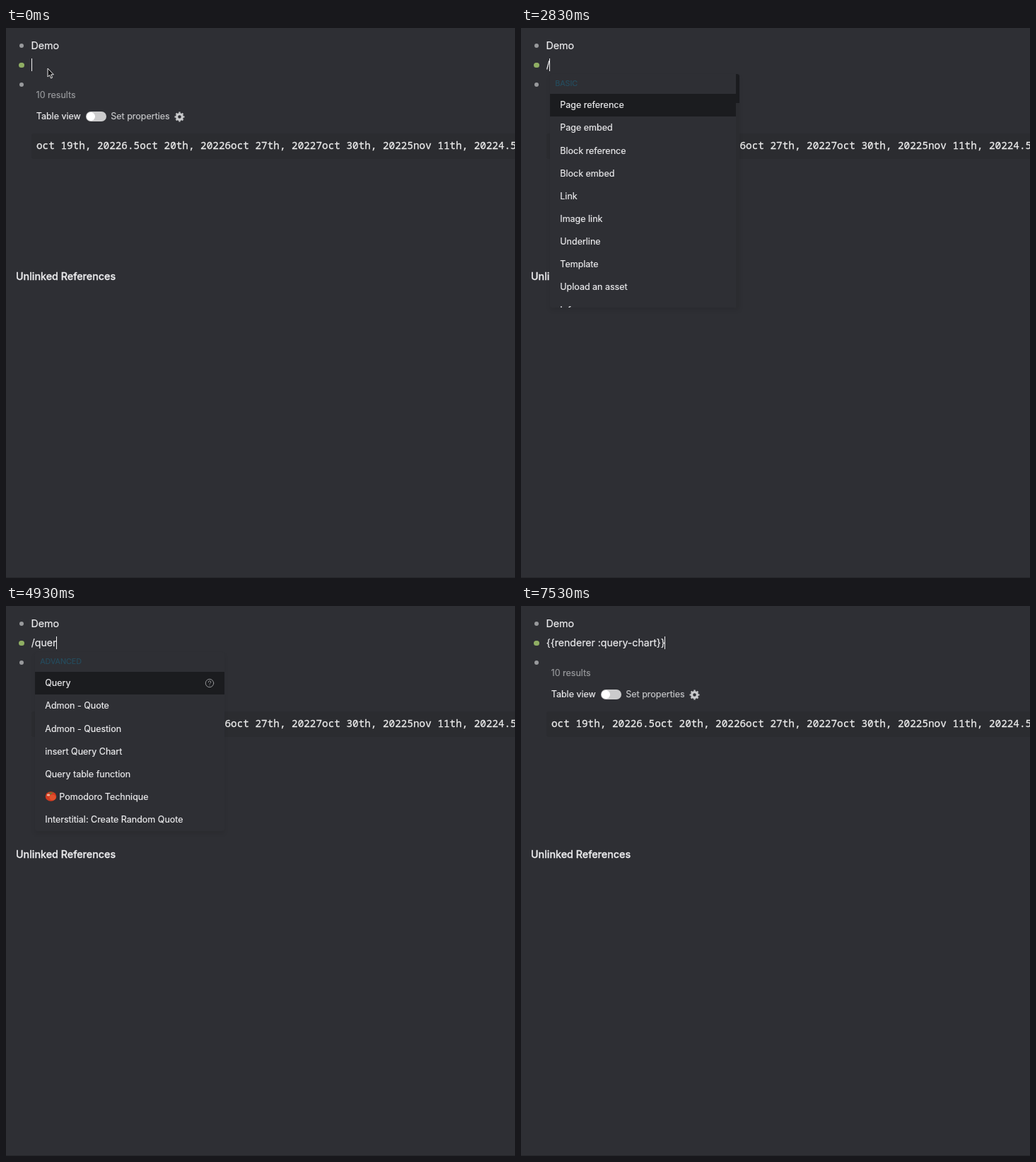
An HTML page for the animation above (8000 ms loop, 720 by 777 pixels).

```html
<!DOCTYPE html>
<html lang="en">
<head>
<meta charset="utf-8">
<title>Query chart demo</title>
<style>
  html, body { margin: 0; width: 100%; height: 100%; overflow: hidden; background: #2e2f34; }
  #stage {
    position: relative; width: 720px; height: 777px; overflow: hidden;
    background: #2e2f34; color: #ececee;
    font: 400 14.3px/20px Inter, sans-serif; white-space: pre;
    -webkit-font-smoothing: antialiased; -webkit-text-stroke: .2px;
  }
  #stage > * { position: absolute; }
  .small { font-size: 12.5px; }
  .dot { width: 6px; height: 6px; left: 19px; border-radius: 50%; background: #98999c; }
  .dot.live { width: 7.4px; height: 7.4px; left: 18.3px; background: #8fae63; }
  .code {
    left: 36px; top: 149px; width: 700px; height: 36px; padding-left: 7px;
    background: #2b2c30; color: #ececec; border-radius: 3px;
    font: 14.33px/34.5px "Noto Sans Mono", monospace; -webkit-text-stroke: .3px;
  }
  .toggle { left: 113px; top: 118px; width: 29px; height: 14px; border-radius: 7px; background: #cbcbcc; }
  .toggle::after {
    content: ""; position: absolute; left: 1px; top: 1px;
    width: 12px; height: 12px; border-radius: 50%; background: #fff;
  }
  #line { left: 35.7px; top: 42px; font-size: 14.1px; }
  #caret { top: 43px; width: 1px; height: 18px; background: #f0f0f2; }
  #menu {
    left: 41px; top: 64.5px; width: 268px; max-height: 330px; overflow: hidden;
    background: #2e2f34; border-radius: 3.5px; font-size: 12.5px;
    box-shadow: 0 4px 6px rgba(0, 0, 0, .08);
  }
  #menu h4 { margin: 0; padding-left: 7.2px; font: 400 10.7px/28.85px Inter, sans-serif; color: #264d5f; }
  #menu .item { position: relative; height: 32.15px; line-height: 32px; padding-left: 14.3px; }
  #menu .item:first-of-type { background: #1b1c1f; }
  #menu.long .item { margin-right: 5px; }
  #menu.long::after {
    content: ""; position: absolute; right: 0; top: 0; width: 5px; height: 330px;
    background: linear-gradient(#1b1c1f 41px, #2b2c30 41px);
  }
  .help { position: absolute; right: 14px; top: 9px; }
  .tomato { vertical-align: -2px; margin-right: 3px; }
  .edge { left: 0; bottom: 0; width: 720px; height: 1px; background: #25262a; }
</style>
</head>
<body>
<div id="stage">
  <i class="dot" style="top:22px"></i>
  <i class="dot live" style="top:48.8px"></i>
  <i class="dot" style="top:77px"></i>
  <div style="left:35.4px;top:14.5px">Demo</div>
  <div id="line"></div>
  <div class="small" style="left:42.6px;top:85px;color:#98999c">10 results</div>
  <div class="small" style="left:42.8px;top:115px">Table view</div>
  <div class="toggle"></div>
  <div class="small" style="left:148.3px;top:115px;color:#c6c7c9">Set properties</div>
  <svg style="left:238px;top:117.5px" width="15" height="15" viewBox="-7.5 -7.5 15 15" fill="none" stroke="#c8c9cb">
    <circle r="3.9" stroke-width="3.2"/>
    <circle r="5.9" stroke-width="2.2" pathLength="80" stroke-dasharray="5 5" stroke-dashoffset="2.5"/>
  </svg>
  <div class="code">oct 19th, 20226.5oct 20th, 20226oct 27th, 20227oct 30th, 20225nov 11th, 20224.5</div>
  <div style="left:14px;top:341px;font-weight:500;-webkit-text-stroke-width:.3px">Unlinked References</div>
  <div class="edge"></div>
  <div id="menu"></div>
  <i id="caret"></i>
  <svg id="pointer" style="left:57px;top:55px" width="13" height="19" viewBox="0 0 13 19">
    <path d="M2 2V14L4.7 11.5L6.6 16L8.6 15.1L6.7 10.8H10.4Z" fill="#101012" stroke="#e8e8e8" stroke-width="1"/>
  </svg>
</div>
<script>
const LOOP = 8000;
const $ = id => document.getElementById(id);

const help = `<svg class="help" width="14" height="14" viewBox="-7 -7 14 14" fill="none" stroke="#8f9093" stroke-linecap="round">
  <circle r="5.7"/><path d="M-1.7 -1.3A1.75 1.75 0 1 1 .8 .1Q0 .5 0 1.2M0 3V3.1"/></svg>`;
const tomato = `<svg class="tomato" width="17" height="15" viewBox="0 0 17 15">
  <ellipse cx="8.5" cy="8" rx="7.8" ry="6.7" fill="#d23a20"/>
  <ellipse cx="11" cy="9.5" rx="4.6" ry="4" fill="#e0512c"/>
  <ellipse cx="5" cy="6" rx="2.3" ry="1.6" fill="#f2b49c"/>
  <path d="M4 2.4Q8 3 12.5 2L9.5 4L8 6L7 3.8Z" fill="#5f7d34"/></svg>`;

const item = text => `<div class="item">${text}</div>`;
const list = (title, items) => (title ? `<h4>${title}</h4>` : "") + items.map(item).join("");
const query = "Query" + help, chart = "insert Query Chart", table = "Query table function";

const menus = {
  none: "",
  basic: list("BASIC", ["Page reference", "Page embed", "Block reference", "Block embed", "Link",
    "Image link", "Underline", "Template", "Upload an asset", "Info"]),
  q: list("ADVANCED", [query, "Admon - Quote", "Admon - Question", chart, table,
    tomato + "Pomodoro Technique", "Interstitial: Create Random Quote"]),
  quer: list("ADVANCED", [query, chart, table]),
  chart: list("", [chart])
};

// start time, typed text, caret x
const typing = [
  [0, "", 36], [1700, "/", 40], [4400, "/q", 49], [4630, "/qu", 57], [4770, "/que", 66],
  [4930, "/quer", 71], [5670, "/querc", 79], [5800, "/querch", 88], [5930, "/quercha", 96],
  [6530, "{{renderer :query-chart}}", 203]
];
const opened = [[0, "none"], [1770, "basic"], [4470, "q"], [4970, "quer"], [5830, "chart"], [6530, "none"]];
const blink = [
  [0, 1], [630, 0], [1100, 1], [1600, 0], [1700, 1], [2170, 0], [2670, 1], [3170, 0], [3700, 1],
  [4170, 0], [4400, 1], [5470, 0], [5670, 1], [6470, 0], [6530, 1], [7030, 0], [7530, 1]
];

const at = (track, t) => track.findLast(step => step[0] <= t);
let shown;

function draw() {
  const t = performance.now() % LOOP;
  const [, text, x] = at(typing, t);
  const name = at(opened, t)[1];
  $("line").textContent = text;
  $("caret").style.left = x + "px";
  $("caret").style.opacity = at(blink, t)[1];
  $("pointer").style.opacity = t < 30 ? 1 : 0;
  if (name !== shown) {
    shown = name;
    $("menu").innerHTML = menus[name];
    $("menu").className = name === "basic" ? "long" : "";
  }
  requestAnimationFrame(draw);
}
draw();
</script>
</body>
</html>
```
